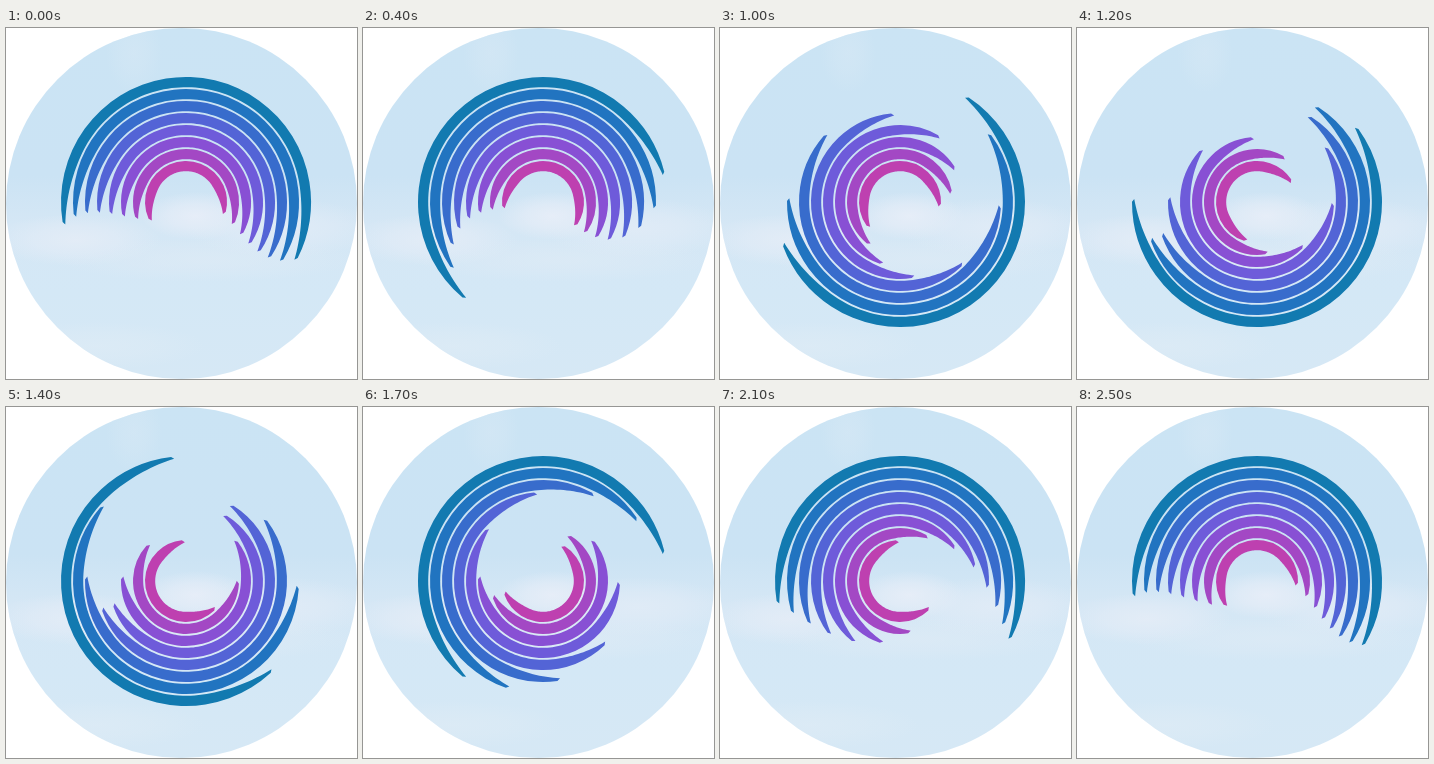
An HTML page with a canvas that plays this animation: 351 by 351 pixels, repeating every 2.6 s.

```html
<!DOCTYPE html>
<html lang="en">
<head>
<meta charset="utf-8">
<title>Rainbow arcs</title>
<style>
  html, body { margin: 0; width: 100%; height: 100%; overflow: hidden; background: #fff; }
  canvas { display: block; width: 351px; height: 351px; }
</style>
</head>
<body>
<canvas id="stage"></canvas>
<script>
const SIZE = 351, LOOP = 2600, STEP = 100;
const CX = 180, CY = 174, COUNT = 8;
const RAD = Math.PI / 180;
const COLORS = ['#127ab0', '#2174c0', '#386ccc', '#5364d6',
                '#6e5bda', '#8850d4', '#a348c4', '#be40b0'];

const canvas = document.getElementById('stage');
const ctx = canvas.getContext('2d');
const dpr = window.devicePixelRatio || 1;
canvas.width = canvas.height = Math.round(SIZE * dpr);

// Cubic Bezier easing with control points (x1, 0) and (x2, 1).
function ease(x, x1 = 0.79, x2 = 0.765) {
  let lo = 0, hi = 1;
  for (let i = 0; i < 24; i++) {
    const u = (lo + hi) / 2, v = 1 - u;
    if (3 * x1 * u * v * v + 3 * x2 * u * u * v + u * u * u < x) lo = u;
    else hi = u;
  }
  return lo * lo * (3 - 2 * lo);
}

// Middle direction of an arc in degrees: swings back and forth, each arc 100 ms later.
function direction(t, k) {
  const phase = (t + 250 - 100 * k + LOOP) % LOOP;
  const half = LOOP / 2;
  return 284 - 235 * ease(1 - Math.abs(phase - half) / half);
}

function cloud(x, y, rx, ry, color, alpha) {
  ctx.save();
  ctx.translate(x, y);
  ctx.scale(rx, ry);
  ctx.globalAlpha = alpha;
  const g = ctx.createRadialGradient(0, 0, 0, 0, 0, 1);
  g.addColorStop(0, color);
  g.addColorStop(0.5, color + 'a0');
  g.addColorStop(1, color + '00');
  ctx.fillStyle = g;
  ctx.fillRect(-1, -1, 2, 2);
  ctx.restore();
}

function drawSky() {
  ctx.fillStyle = '#fff';
  ctx.fillRect(0, 0, SIZE, SIZE);
  ctx.save();
  ctx.beginPath();
  ctx.arc(175.5, 175.5, 175.5, 0, 2 * Math.PI);
  ctx.clip();
  const g = ctx.createLinearGradient(0, 0, 0, SIZE);
  g.addColorStop(0, '#cbe4f4');
  g.addColorStop(0.42, '#cbe3f4');
  g.addColorStop(0.56, '#d5e7f5');
  g.addColorStop(0.75, '#d4e8f6');
  g.addColorStop(1, '#d6e8f5');
  ctx.fillStyle = g;
  ctx.fillRect(0, 0, SIZE, SIZE);
  cloud(128, 25, 28, 40, '#d6e8f5', 0.6);
  cloud(70, 212, 85, 26, '#e6edf7', 0.8);
  cloud(190, 188, 55, 24, '#e8eef8', 0.9);
  cloud(275, 200, 95, 30, '#e2ecf7', 0.8);
  cloud(200, 232, 150, 22, '#dfebf6', 0.6);
  cloud(90, 318, 110, 24, '#dfecf6', 0.6);
  ctx.restore();
}

// Ring segment whose inner edge curves out to slim, slanted tips.
function drawArc(k, mid) {
  const r = 125 - 12 * k;
  const half = 109.3 + 0.55 * k;
  const taper = 36 + 2 * k;
  const slant = 3 / r / RAD;
  const point = (radius, a) =>
    ctx.lineTo(CX + radius * Math.cos(a * RAD), CY + radius * Math.sin(a * RAD));

  ctx.beginPath();
  ctx.arc(CX, CY, r, (mid - half + slant) * RAD, (mid + half - slant) * RAD);
  for (let i = 0; i <= 110; i++) {
    const a = half * (1 - i / 55);
    const s = Math.min(1, (half - Math.abs(a)) / taper);
    point(r - 2.2 - 8 * (1 - (1 - s) ** 2), mid + a);
  }
  ctx.closePath();
  ctx.fillStyle = COLORS[k];
  ctx.fill();
}

function frame() {
  const t = Math.floor((performance.now() % LOOP) / STEP) * STEP;
  ctx.setTransform(dpr, 0, 0, dpr, 0, 0);
  drawSky();
  for (let k = 0; k < COUNT; k++) drawArc(k, direction(t, k));
  requestAnimationFrame(frame);
}
frame();
</script>
</body>
</html>
```
